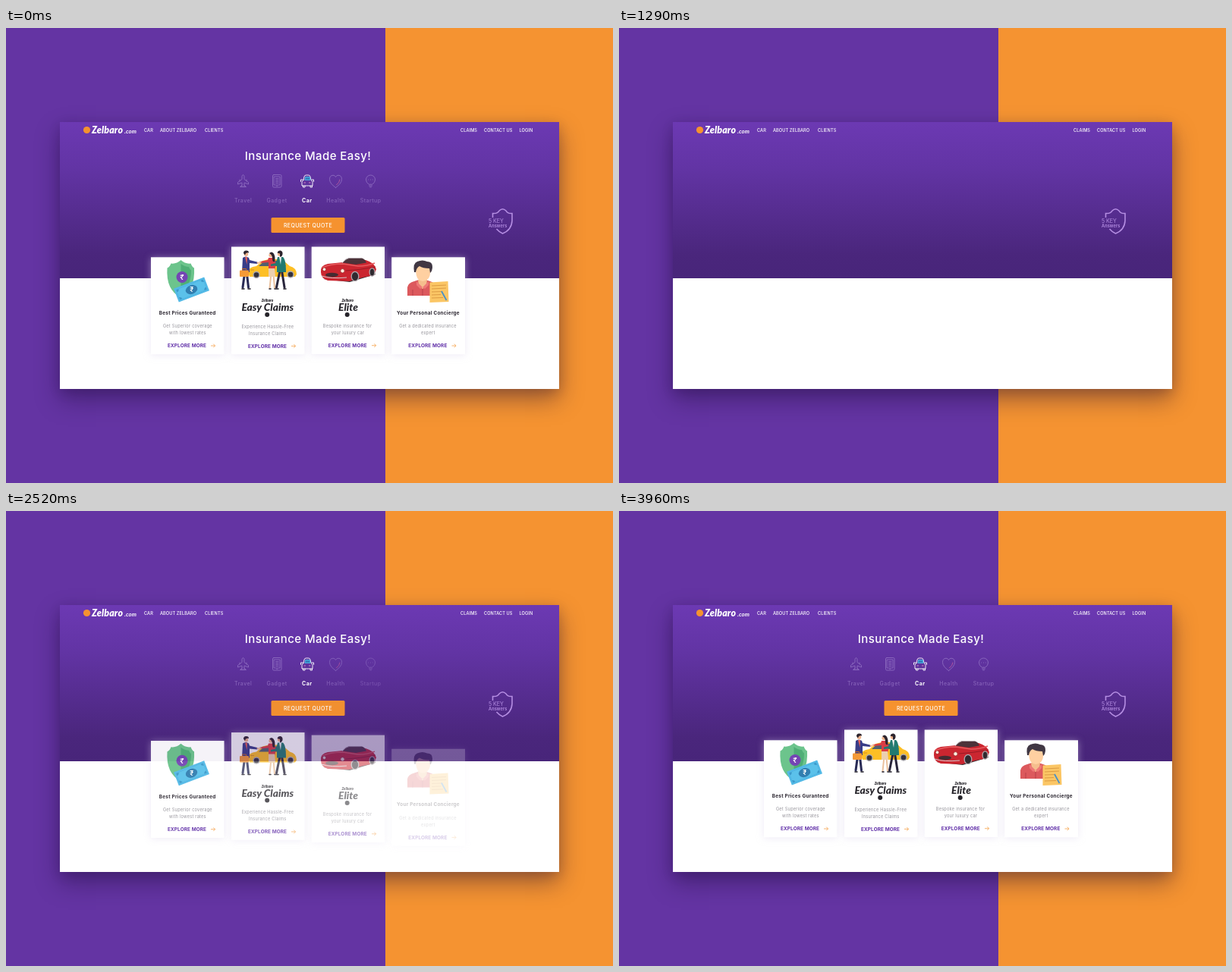
An HTML page that plays this animation: 800 px wide and 600 px high, repeating every 3990 ms.

```html
<!DOCTYPE html>
<html lang="en">
<head>
<meta charset="utf-8">
<title>Insurance Made Easy</title>
<style>
  html, body { margin: 0; width: 100%; height: 100%; overflow: hidden; }
  body { position: relative; background: linear-gradient(90deg, #6434a3 500px, #f59331 500px); }
  .panel { position: absolute; left: 71px; top: 124px; width: 658px; height: 352px; background: #fff;
    box-shadow: 0 14px 30px rgba(25, 8, 50, .4), 0 4px 14px rgba(25, 8, 50, .16); }
  svg { position: absolute; left: 0; top: 0; width: 800px; height: 600px; }
  text { font-family: Inter, "Open Sans", sans-serif; }
  .mid text, text.mid { text-anchor: middle; }
  .nav text { font-size: 5.6px; font-weight: 500; letter-spacing: .1px; fill: #fff; }
  .brand { font-family: Lato, sans-serif; font-style: italic; font-weight: 900; }
  .title { font-size: 15px; font-weight: 500; letter-spacing: .43px; fill: #fff; }
  .tab { fill: none; stroke: #8d6bc0; stroke-width: .9; stroke-linejoin: round; stroke-linecap: round; }
  .tab text { font-size: 7px; font-weight: 500; letter-spacing: .45px; fill: #8763ba; stroke: none; }
  .tab.on { stroke: #fff; }
  .tab.on text { fill: #fff; font-weight: 700; }
  .quote { font-size: 7px; font-weight: 500; letter-spacing: .4px; fill: #fff; }
  .box { fill: #fff; filter: drop-shadow(0 1px 5px rgba(222, 214, 238, .5)); }
  .name { font-size: 6.4px; font-weight: 700; letter-spacing: .25px; fill: #2b2630; }
  .body { font-size: 5.6px; letter-spacing: .25px; fill: #95939a; }
  .more { font-size: 6.4px; font-weight: 700; letter-spacing: .12px; fill: #6130a8; }
  .arrow { fill: none; stroke: #f5a24c; stroke-width: .8; }
  .plan { font-size: 13.8px; fill: #252329; }
  .plan-brand { font-size: 4.8px; fill: #252329; }
  .key { fill: #b48de2; }
</style>
</head>
<body>
<div class="panel"></div>
<svg viewBox="0 0 800 600">
  <defs>
    <linearGradient id="hero" x1="0" y1="0" x2="0" y2="1">
      <stop offset="0" stop-color="#6c39b3"/>
      <stop offset=".3" stop-color="#6234a4"/>
      <stop offset=".85" stop-color="#4a267c"/>
      <stop offset="1" stop-color="#48257a"/>
    </linearGradient>
    <path id="arrow" class="arrow" d="M270 419h5.5m-2.2-2.3 2.3 2.3-2.3 2.3"/>
  </defs>

  <g data-start="30" data-length="600">
    <rect x="71" y="124" width="658" height="206" fill="url(#hero)"/>
    <path d="M641.5 250v-5.5q6.500.5 8.500-3.500q4.500-4.500 9 0q2 4 8 3.500v8.500q0 13-12.500 18q-4.500-2-8-6" fill="none" stroke="#b48de2" stroke-width="1.6"/>
    <text class="key" x="636" y="256.600" font-size="7">5 KEY</text>
    <text class="key" x="636" y="263.400" font-size="5.600" font-weight="600" letter-spacing=".1">Answers</text>
  </g>

  <g class="nav" data-start="250" data-dy="-5">
    <circle cx="106.500" cy="134.500" r="4.600" fill="#f5922f"/>
    <text class="brand" x="113" y="138.800" style="font-size:12.4px;font-weight:900">Zelbaro</text>
    <text class="brand" x="156" y="138.800" style="font-size:7.8px;font-weight:700">.com</text>
    <text x="182" y="137">CAR</text>
    <text x="203" y="137">ABOUT ZELBARO</text>
    <text x="262" y="137">CLIENTS</text>
    <text x="599" y="137">CLAIMS</text>
    <text x="630" y="137">CONTACT US</text>
    <text x="676.500" y="137">LOGIN</text>
  </g>

  <text class="title mid" x="398" y="173.700" data-start="1390" data-dy="-5">Insurance Made Easy!</text>

  <g class="mid">
    <g class="tab" data-start="1430">
      <path d="M311 209v-5l-5.500 2v-2.500l5.500-4v-4q1.500-4 3 0v4l5.500 4v2.500l-5.500-2v5m-3-2-2.500 2.500h8l-2.500-2.500M308 202v-2m9 2v-2"/>
      <text x="312.700" y="229.800">Travel</text>
    </g>
    <g class="tab" data-start="1590">
      <rect x="351.500" y="193.500" width="11.500" height="16.500" rx="1.500"/>
      <path d="M353.500 196h7.500v11h-7.500zM355.500 198.500h3.500m-3.500 2h3.500m-3.500 2h3.500m-3.500 2h3.500m-2.300 3.800h1"/>
      <text x="357" y="229.800">Gadget</text>
    </g>
    <g class="tab on" data-start="1720">
      <path d="M392 200.500 393 196q.500-2 2.500-2h3q2 0 2.500 2l1 4.500q2 1 2 3v4.500h-14V203.500q0-2 2-3zM391.500 208v2h2.500v-2m7 0v2h2.500v-2M391 200h-2.500v2.500m14.500-2.500h2.500v2.500"/>
      <path d="M394 200l.700-3.500h5.600l.700 3.500z" stroke="#4ec3ee" fill="#347fbd"/>
      <path d="M393 204h1.500m5 0h1.500" stroke="#e994c6"/>
      <text x="396.800" y="229.800">Car</text>
    </g>
    <g class="tab" data-start="2050">
      <path d="M434.500 210.500q-8-5.500-8-11q0-5 4.500-5.300q2.500 0 3.500 2.300q1-2.300 3.500-2.300q4.500.300 4.500 5.300q0 5.500-8 11z"/>
      <path d="M440 200q-.500 4-4.500 7" stroke="#b95ba1"/>
      <text x="434.500" y="229.800">Health</text>
    </g>
    <g class="tab" data-start="2200">
      <path d="M478 206q-3.500-2-3.500-6a6 6 0 0 1 12 0q0 4-3.500 6zM478.500 208h4m-3 1.800h2M477.600 200h.1m2.700 0h.1m2.700 0h.1"/>
      <text x="480.600" y="229.800">Startup</text>
    </g>
  </g>

  <g data-start="1830" data-dy="6">
    <rect x="349.500" y="250" width="97" height="20" rx="1.500" fill="#f5922f"/>
    <text class="quote mid" x="398" y="262.600">REQUEST QUOTE</text>
  </g>

  <g data-start="1900" data-dy="15">
    <rect class="box" x="191" y="302.300" width="96.500" height="128"/>
    <path d="M230.500 306q6 5.500 13 4.500q2 5 4.500 6q1.500 29-17.500 39q-20-10-18-39q3-1 5-6q7 1 13-4.500z" fill="#6cc48c"/>
    <path d="M230.500 311q5 4 10.500 4q1 3 3 4.500q0 21-13.500 30z" fill="#4fae76"/>
    <circle cx="232" cy="328.500" r="7.500" fill="#7445b4"/>
    <text class="mid" x="232" y="332" font-size="9.500" font-weight="600" fill="#fff">₹</text>
    <g transform="rotate(-21 244.500 345)">
      <rect x="223" y="335.500" width="43" height="19" fill="#52b9e6"/>
      <rect x="225.500" y="338" width="38" height="14" fill="#3d9acb"/>
      <path d="M229 338h31a4 4 0 0 0 3.500 3.500v7a4 4 0 0 0-3.500 3.500h-31a4 4 0 0 0-3.500-3.500v-7a4 4 0 0 0 3.500-3.500z" fill="#5bc1ea"/>
      <ellipse cx="244.500" cy="345" rx="8" ry="5.800" fill="#317eb0"/>
    </g>
    <text class="mid" x="244.700" y="348" font-size="9" font-weight="600" fill="#fff">₹</text>
    <g class="mid">
      <text class="name" x="239.200" y="377.800">Best Prices Guranteed</text>
      <text class="body" x="239.400" y="395.300">Get Superior coverage</text>
      <text class="body" x="239.400" y="404.300">with lowest rates</text>
    </g>
    <text class="more" x="213" y="421.400">EXPLORE MORE</text>
    <use href="#arrow"/>
  </g>

  <g data-start="2110" data-dy="15">
    <rect class="box" x="297" y="288.500" width="96.500" height="141.800"/>
    <path d="M319 323q0-8 11-9l8-7q14-5 28 0l8 7q9 2 9 11l-2 3h-60z" fill="#fdbf25"/>
    <path d="M333 314l6-5.500q5-2 10-2v7.500zm18 0v-7.500q8 0 13 2l5 5.500z" fill="#52606f"/>
    <path d="M322 319h5m22-4v11" stroke="#d8931d" fill="none"/>
    <g fill="#34313a" stroke="#aaa9b0" stroke-width="1.400">
      <circle cx="330" cy="325.500" r="4"/><circle cx="375" cy="325" r="4"/>
    </g>
    <g fill="none" stroke-linecap="round">
      <path d="M315 320l-3 22m5-22 2.500 22" stroke="#292b55" stroke-width="3"/>
      <path d="M350 319l-2.500 24m4.500-24 2 24" stroke="#eac19d" stroke-width="2"/>
      <path d="M361 320l-4.500 22m7-22 3.500 22" stroke="#29263c" stroke-width="3"/>
      <path d="M311 344h3m5 0h3m25 0h2m5 0h2m0 0h3m7 0h3" stroke="#201e28" stroke-width="1.600"/>
    </g>
    <path d="M312 303q4-3 8 0l1 3 10 2.500v2.500l-10-1v12h-10z" fill="#383d88"/>
    <path d="M315 302h3l-.500 10z" fill="#e26059"/>
    <rect x="308" y="319.500" width="12" height="8.500" rx="1" fill="#f59a37"/>
    <path d="M311.500 319.500v-2h5v2" fill="none" stroke="#c56c24"/>
    <path d="M346 303h7q4 8 1 16h-8v-10l-11 1v-2l10-2z" fill="#da3e45"/>
    <path d="M346 317h8l1 11h-9z" fill="#ecd0b0"/>
    <path d="M358 302h7q4 3 4 20h-12v-9l-8 1v-2.500l7-1.500z" fill="#217a70"/>
    <path d="M360 302h3l-1 10z" fill="#eee"/>
    <g fill="#efb48e">
      <circle cx="316.500" cy="298.300" r="2.700"/><circle cx="349" cy="299.500" r="2.600"/><circle cx="360.500" cy="298" r="2.700"/>
      <circle cx="332" cy="309.800" r="1.400"/><circle cx="335" cy="309" r="1.400"/>
    </g>
    <path d="M313 297q0-4 4-3.500 3 0 3 3-4-1-5 3zM347 297q3-3 5.500 0 3 4 1.500 11-3 1-3-4 0-5-4-7zM357.500 296.500q1-3.500 4.500-3 3 1 2.500 5-1 4-3.500 3v-4z" fill="#2c242d"/>
    <circle cx="344.200" cy="378" r="3" fill="#252329"/>
    <g class="mid">
      <text class="brand plan-brand" x="344.500" y="361">Zelbaro</text>
      <text class="brand plan" x="344.700" y="373.300" style="font-weight:800">Easy Claims</text>
      <text class="body" x="344.800" y="395.600">Experience Hassle-Free</text>
      <text class="body" x="344.800" y="404.500">Insurance Claims</text>
    </g>
    <text class="more" x="319" y="421.800">EXPLORE MORE</text>
    <use href="#arrow" x="106" y=".4"/>
  </g>

  <g data-start="2270" data-dy="15">
    <rect class="box" x="402.700" y="288.500" width="96.300" height="141.500"/>
    <path d="M418 331l35 4 34-10-3-5z" fill="#3a3035"/>
    <path d="M415 322q-1-9 9-11l20-2q6-4 14-4l16 1q11 3 14 12l-3 8-15 3-18 5-28-1q-9-3-9-11z" fill="#cb2630"/>
    <path d="M444 309.500q4-5 8-6h17q4 1 6 6l-14 2.500z" fill="#4c3239"/>
    <path d="M443 310q4-6 9-6.500h15" fill="none" stroke="#aaa0a6"/>
    <path d="M417 316q10-5 27-5l20 3q12 0 22-4" fill="none" stroke="#e75b5e" stroke-width="1.400"/>
    <path d="M448 320q18-1 39-5" fill="none" stroke="#981a25"/>
    <g fill="#302a30" stroke="#b1a9ae" stroke-width="1.300">
      <ellipse cx="460" cy="327.500" rx="4.800" ry="6.200"/><ellipse cx="482.500" cy="322" rx="3.400" ry="5.200"/>
    </g>
    <ellipse cx="429.500" cy="325.500" rx="8.500" ry="2.800" fill="#452b31"/>
    <g fill="#fff0df" stroke="#9c2028" stroke-width=".8">
      <circle cx="419.500" cy="318.300" r="2.300"/><circle cx="443.500" cy="320.300" r="2.700"/>
    </g>
    <path d="M416 327q12 4 33 2" fill="none" stroke="#d5c9cc"/>
    <circle cx="449.700" cy="378" r="3" fill="#252329"/>
    <g class="mid">
      <text class="brand plan-brand" x="450.300" y="360.500">Zelbaro</text>
      <text class="brand plan" x="451" y="373" style="font-weight:800">Elite</text>
      <text class="body" x="450" y="394.900">Bespoke insurance for</text>
      <text class="body" x="450.500" y="403.900">your luxury car</text>
    </g>
    <text class="more" x="424.700" y="421">EXPLORE MORE</text>
    <use href="#arrow" x="212" y="-.3"/>
  </g>

  <g data-start="2420" data-dy="15">
    <rect class="box" x="508.200" y="302.300" width="96.800" height="128"/>
    <path d="M529 353v-11q1-6 9-8l6-2h9l6 2q7 2 8 8v11z" fill="#dc595d"/>
    <path d="M543 332h12l-1 8-5 4-5-4z" fill="#f5be8d"/>
    <path d="M541 334l8 8 8-8v5l-5 5-3-2-3 2-5-5z" fill="#ee7876"/>
    <path d="M549 344v9m-13-8v8" stroke="#b8414b" stroke-width="1"/>
    <path d="M540 317q0-7 9-7t10 8q1 9-3 13-7 6-13 0-3-4-3-14z" fill="#ffd0a1"/>
    <path d="M538 322q-2-12 4-14 7-3 13 0 7 0 7 7 0 5-3 8l-1-6q-9 0-13-3-4 2-5 8z" fill="#403743"/>
    <path d="M558.500 335.500l24-1.500 1 27-25 1z" fill="#fbc665"/>
    <path d="M561 340l19-1m-19 5 19-1m-19 5 13-.500m-13 4.500 12-.500m-12 4.500 15-.500" stroke="#d89640" stroke-width=".9"/>
    <path d="M574 347l6.500 12" stroke="#4a91c8" stroke-width="1.800"/>
    <g class="mid">
      <text class="name" x="556.500" y="377.800">Your Personal Concierge</text>
      <text class="body" x="556" y="395.300">Get a dedicated insurance</text>
      <text class="body" x="556.300" y="404.300">expert</text>
    </g>
    <text class="more" x="530.300" y="421.400">EXPLORE MORE</text>
    <use href="#arrow" x="317.500"/>
  </g>
</svg>
<script>
  const LOOP = 3990, HOLD = 30, FADE = 800;
  const parts = [...document.querySelectorAll('[data-start]')].map(el => ({
    el,
    start: +el.dataset.start,
    length: +(el.dataset.length || FADE),
    dy: +(el.dataset.dy || 0)
  }));
  const began = performance.now();

  // The finished page shows briefly, then everything fades in again.
  function draw(now) {
    const t = Math.max(0, now - began) % LOOP;
    for (const { el, start, length, dy } of parts) {
      const p = t < HOLD ? 1 : Math.min(1, Math.max(0, (t - start) / length));
      const left = (1 - p) ** 2;
      el.setAttribute('opacity', 1 - left);
      if (dy) el.setAttribute('transform', `translate(0 ${dy * left})`);
    }
    requestAnimationFrame(draw);
  }
  draw(began);
</script>
</body>
</html>
```
